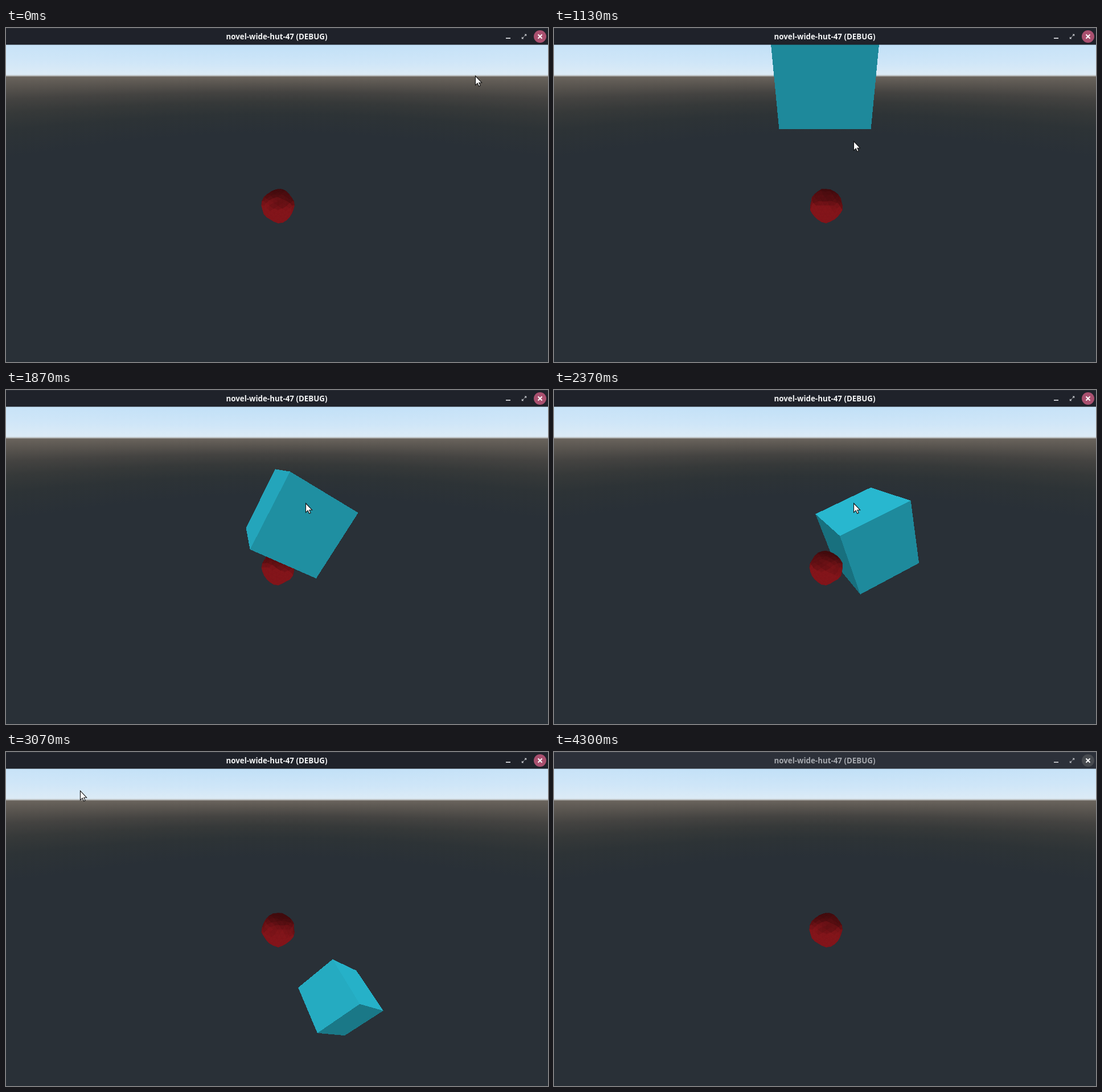
An HTML page with a canvas for the animation above (4.33 s loop, 952 by 588 pixels).

```html
<!DOCTYPE html>
<html lang="en">
<head>
<meta charset="utf-8">
<title>Falling cube</title>
<style>
html, body { margin: 0; width: 100%; height: 100%; overflow: hidden; background: #293037; }
canvas, svg { position: absolute; left: 0; top: 0; display: block; }
text { font: 700 13.33px "Noto Sans", "Open Sans", sans-serif; }
</style>
</head>
<body>
<canvas id="sky" width="952" height="588"></canvas>
<svg id="stage" width="952" height="588" viewBox="0 0 952 588">
  <g id="sides" shape-rendering="crispEdges"></g>
  <g id="ball" stroke-width=".7" stroke-linejoin="round"></g>
  <g id="front" shape-rendering="crispEdges"></g>
  <rect id="bar" width="952" height="29.5"/>
  <rect id="rim" width="952" height="1"/>
  <text id="title" x="475.5" y="19.5" text-anchor="middle">novel-wide-hut-47 (DEBUG)</text>
  <g id="icons">
    <rect x="878" y="17" width="8" height="2"/>
    <path d="M910.6 10.8H914.2V14.4ZM905.8 15.6V19.2H909.4Z"/>
    <path d="M907 18L913 12" stroke-width="1.2" stroke-dasharray="3.4 1.7"/>
  </g>
  <circle id="close" cx="938" cy="15" r="11"/>
  <path d="M934.5 11.5l7 7m0-7l-7 7" stroke="#fff" stroke-width="2"/>
  <path id="cursor" d="M.5 .5V16.6L4.2 13.2L6.6 18.5L9.1 17.4L6.8 12.2H11.6Z" fill="#fff" stroke="#111" stroke-width="1.1"/>
</svg>
<script>
const LOOP = 4330, FOCAL = 398.4, CX = 476, CY = 309;
const COS = 0.872, SIN = 0.49, UP = [0, -COS, -SIN];
const $ = id => document.getElementById(id);

const dot = (a, b) => a[0] * b[0] + a[1] * b[1] + a[2] * b[2];
const cross = (a, b) => [a[1] * b[2] - a[2] * b[1], a[2] * b[0] - a[0] * b[2], a[0] * b[1] - a[1] * b[0]];
const add = (a, b, k = 1) => a.map((v, i) => v + b[i] * k);
const scale = (a, k) => a.map(v => v * k);
const unit = a => scale(a, 1 / Math.hypot(...a));
const clamp = (v, lo, hi) => Math.min(hi, Math.max(lo, v));
const shade = (rgb, k) => `rgb(${rgb.map(v => Math.round(v * k))})`;

function newPath(parent) {
  const p = document.createElementNS("http://www.w3.org/2000/svg", "path");
  return $(parent).appendChild(p);
}
const outline = pts => "M" + pts.map(p => p[0].toFixed(2) + " " + p[1].toFixed(2)).join("L") + "Z";

// Sky and ground: the fade grows longer towards the sides.
function paintSky() {
  const g = $("sky").getContext("2d");
  const stops = [[-80, "#b4daf6"], [-55, "#c1e0f7"], [-22, "#cfe6f8"], [-3, "#dcebf6"], [-0.8, "#b8bab9"],
    [1, "#69635c"], [14, "#57534e"], [28, "#444341"], [45, "#363939"], [66, "#2d3336"], [100, "#293037"]];
  for (let x = 0; x < 952; x++) {
    const s = Math.hypot(1, (x - CX) / 457);
    const fade = g.createLinearGradient(0, 0, 0, 588);
    for (const [y, c] of stops) {
      fade.addColorStop(clamp((85 + y * (Math.abs(y) > 4 ? s : 1)) / 588, 0, 1), c);
    }
    g.fillStyle = fade;
    g.fillRect(x, 0, 1, 588);
  }
}

// Lumpy ball: a twice divided icosahedron.
function makeBall() {
  const G = (1 + Math.sqrt(5)) / 2, v = [];
  for (const a of [-1, 1]) for (const b of [-G, G]) v.push([0, a, b], [a, b, 0], [b, 0, a]);
  const near = (a, b) => Math.abs(Math.hypot(...add(a, b, -1)) - 2) < 0.01;
  let faces = [];
  for (let i = 0; i < 12; i++) for (let j = 0; j < i; j++) for (let k = 0; k < j; k++) {
    if (near(v[i], v[j]) && near(v[j], v[k]) && near(v[i], v[k])) faces.push([v[i], v[j], v[k]].map(unit));
  }
  for (let n = 0; n < 2; n++) {
    faces = faces.flatMap(([a, b, c]) => {
      const ab = unit(add(a, b)), bc = unit(add(b, c)), ca = unit(add(c, a));
      return [[a, ab, ca], [b, bc, ab], [c, ca, bc], [ab, bc, ca]];
    });
  }
  const lump = ([x, y, z]) => 1 + 0.035 * Math.sin(5 * x + 1) * Math.sin(4 * z + 2)
    + 0.022 * Math.sin(7 * y + 3 * x) + 0.018 * Math.sin(9 * z - 5 * y);
  return faces.map(f => ({ pts: f.map(p => scale(p, lump(p))), el: newPath("ball") }));
}

function drawBall(t) {
  const a = t / LOOP * 2 * Math.PI, c = Math.cos(a), s = Math.sin(a);
  for (const { pts, el } of ball) {
    const p = pts.map(([x, y, z]) => [x * c + z * s, y, z * c - x * s]);
    let n = unit(cross(add(p[1], p[0], -1), add(p[2], p[0], -1)));
    if (dot(n, p[0]) < 0) n = scale(n, -1);
    if (n[2] > 0.02) { el.setAttribute("d", ""); continue; }
    const color = shade([132, 21, 26], clamp(0.88 + 0.42 * n[1] - 0.06 * n[0], 0.5, 1));
    el.setAttribute("d", outline(p.map(q => [478 + q[0] * 28.4, 312.7 + q[1] * 29])));
    el.setAttribute("fill", color);
    el.setAttribute("stroke", color);
  }
}

// Time, then two cube axes as seen by the camera.
const turns = [
  [1300, [1, 0, 0], [0, COS, SIN]],
  [1370, [0.9963, 0.0537, 0.066], [-0.0774, 0.878, 0.472]],
  [1870, [0.8656, 0.3726, 0.3347], [-0.4744, 0.8315, 0.2884]],
  [2370, [0.33, 0.769, 0.547], [-0.8896, 0.4437, -0.1097]],
  [3070, [-0.6545, 0.6636, 0.3614], [-0.6964, -0.3446, -0.6285]]
].map(([t, x, y]) => {
  const ux = unit(x), uy = unit(add(y, ux, -dot(ux, y)));
  return { t, axes: [ux, uy, cross(ux, uy)] };
});

function cubeAxes(t) {
  let i = 0;
  while (i < turns.length - 2 && t >= turns[i + 1].t) i++;
  const a = turns[i], b = turns[i + 1];
  const trace = a.axes.reduce((sum, v, j) => sum + dot(v, b.axes[j]), 0);
  const pivot = unit(a.axes.reduce((sum, v, j) => add(sum, cross(v, b.axes[j])), [0, 0, 0]));
  const u = Math.max(0, (t - a.t) / (b.t - a.t));
  const ease = i === 1 || i === 2 ? u * (0.88 + 0.12 * u) : u;
  const angle = Math.acos(clamp((trace - 1) / 2, -1, 1)) * ease;
  const c = Math.cos(angle), s = Math.sin(angle);
  return a.axes.map(v => add(add(scale(v, c), cross(pivot, v), s), pivot, dot(pivot, v) * (1 - c)));
}

// Time, place (right, down, ahead) in cube widths, speed per second.
const moves = [
  [1300, [0, 0.985, 3.05], [0.5, 0.5, 0.15]],
  [1370, [0.042, 1.015, 3.061], [0.35, 0.05, 0.14]],
  [1870, [0.253, 1.037, 3.132], [0.55, 0.15, 0.15]],
  [2370, [0.621, 1.322, 3.214], [0.94, 1.51, 0.22]]
];
const GRAVITY = 4.9;

function cubePlace(t) {
  if (t < 1300) return [0, -3 + GRAVITY / 2 * ((t - 24) / 1000) ** 2, 3.05];
  const i = moves.findLastIndex(m => t >= m[0]);
  const [t0, p0, v0] = moves[i], s = (t - t0) / 1000;
  if (i === moves.length - 1) return add(add(p0, v0, s), [0, GRAVITY / 2 * s * s, 0]);
  const [t1, p1, v1] = moves[i + 1], d = (t1 - t0) / 1000, u = s / d;
  const h = u * u * (3 - 2 * u);
  return p0.map((p, j) => p + (p1[j] - p) * h
    + d * u * (1 - u) * ((1 - u) * v0[j] - u * v1[j]));
}

const project = p => [CX + FOCAL * p[0] / p[2], CY + FOCAL * p[1] / p[2]];

function drawCube(t) {
  const [x, down, ahead] = cubePlace(t);
  const center = [x, down * COS - ahead * SIN, down * SIN + ahead * COS];
  const axes = cubeAxes(t), shown = down > -1 && down < 13;
  for (const { axis, sign, el } of cube) {
    const n = scale(axes[axis], sign), mid = add(center, n, 0.5);
    if (!shown || dot(n, mid) >= 0) { el.setAttribute("d", ""); continue; }
    const u = axes[(axis + 1) % 3], v = axes[(axis + 2) % 3];
    const pts = [[-1, -1], [1, -1], [1, 1], [-1, 1]].map(([a, b]) =>
      project(add(add(mid, u, a / 2), v, b / 2)));
    const lit = dot(n, UP);
    el.setAttribute("d", outline(pts));
    el.setAttribute("fill", shade([40, 184, 208], (155 + 76 * lit - 22 * lit * lit) / 208));
  }
}

const trail = [[0, 824, 84], [100, 824, 84], [500, 749.5, 95], [900, 749.5, 95], [1080, 526, 199],
  [2620, 526, 199], [3070, 130, 68], [3190, 88, 26], [3500, 60, 8], [3700, 48, 0], [3740, 47, -20]];

function drawCursor(t) {
  const i = trail.findIndex(k => t < k[0]);
  $("cursor").style.display = i < 0 ? "none" : "";
  if (i < 0) return;
  const a = trail[i - 1], b = trail[i], u = (t - a[0]) / (b[0] - a[0]);
  const k = u * u * (3 - 2 * u);
  $("cursor").setAttribute("transform", `translate(${a[1] + (b[1] - a[1]) * k} ${a[2] + (b[2] - a[2]) * k})`);
}

function drawBar(t) {
  const active = t < 3950;
  const fill = (id, on, off) => $(id).setAttribute("fill", active ? on : off);
  fill("bar", "#1f222a", "#2c3039");
  fill("rim", "#2b2e36", "#383c45");
  fill("title", "#f3f4f5", "#a5a8ae");
  fill("icons", "#c4c6ca", "#b4b6bb");
  fill("close", "#a9506f", "#484b50");
  $("icons").setAttribute("stroke", active ? "#c4c6ca" : "#b4b6bb");
  $("icons").setAttribute("stroke-width", 0);
}

const ball = makeBall();
const cube = [0, 1, 2].flatMap(axis => [-1, 1].map(sign =>
  ({ axis, sign, el: newPath(axis === 2 && sign < 0 ? "front" : "sides") })));

function draw(t) {
  drawBall(t);
  drawCube(t);
  drawCursor(t);
  drawBar(t);
}

paintSky();
draw(0);
const start = performance.now();
function tick() {
  draw((performance.now() - start) % LOOP);
  requestAnimationFrame(tick);
}
requestAnimationFrame(tick);
</script>
</body>
</html>
```
